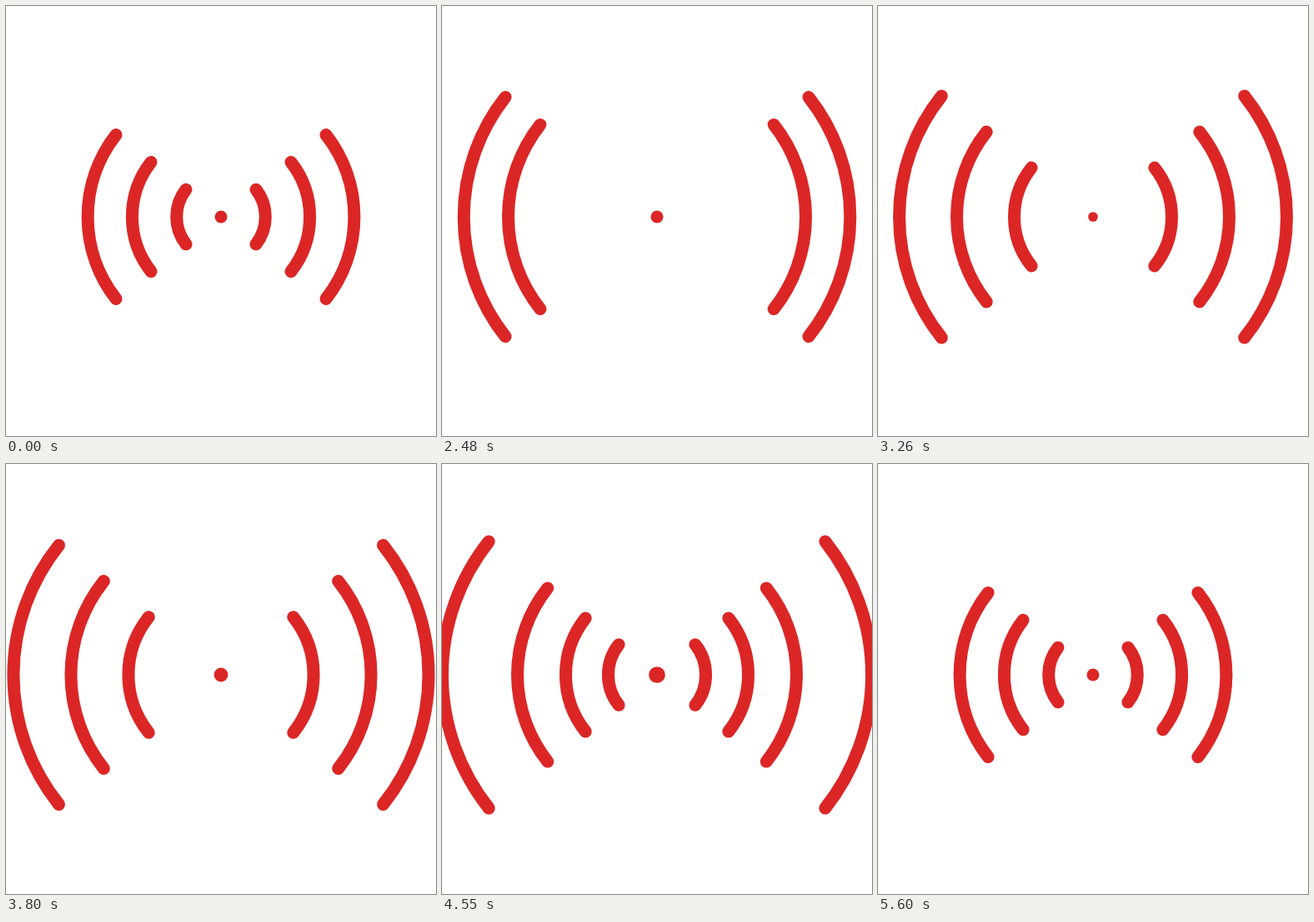
Write an HTML page with a canvas that moves like this. It is 516x516 px and loops after 5630 ms.

```html
<!DOCTYPE html>
<html lang="en">
<head>
<meta charset="utf-8">
<title>Signal waves</title>
<style>
  html, body { margin: 0; width: 100%; height: 100%; overflow: hidden; background: #fff; }
  canvas { display: block; width: 100vw; height: 100vh; }
</style>
</head>
<body>
<canvas id="stage" width="516" height="516"></canvas>
<script>
const ctx = document.getElementById('stage').getContext('2d');
const LOOP = 5630, START = 2030, END = 5600;
const CX = 258, CY = 253;
const STEP = 53.3, REST = [STEP, 2 * STEP, 3 * STEP];
const SPEED = 0.2875, PERIOD = 240, FIRST = 2455, MAX_R = 276;
const PULSE_FROM = 2954, PULSE_TO = 4550;
const SETTLE_FROM = [4110, 4083, 3895];

const bell = (t, mid, width) => Math.exp(-(((t - mid) / width) ** 2));

function backOut(x) {
  const u = Math.min(x, 1) - 1;
  return 1 + 2.7 * u ** 3 + 1.7 * u ** 2;
}

function radii(t) {
  if (t < START || t >= END) return REST;
  const list = [];

  // The resting arcs fly off
  if (t < 2585) {
    const x = t - START, d = SPEED * x * x / (x + 16);
    list.push(...REST.map(r => r + d).filter(r => r < 264));
  }

  // Evenly spaced waves follow, the first ones a little ahead
  const age = t - FIRST;
  const travel = SPEED * age + 15 * Math.exp(-age / 270);
  for (let k = 0; k < 6; k++) list.push(travel - k * SPEED * PERIOD);

  // The last three overshoot and come to rest
  REST.forEach((r, i) => {
    const x = (t - SETTLE_FROM[i]) / (800 + 375 * i);
    if (x > 0) list.push(r * backOut(x));
  });
  return list.filter(r => r >= STEP && r < MAX_R);
}

function dotRadius(t) {
  if (t < PULSE_FROM) return 7.5 + 2.5 * bell(t, 2780, 110);
  if (t >= PULSE_TO) return 7.5 + 2.4 * bell(t, 4580, 250);
  return 8 + 2.2 * Math.sin(2 * Math.PI * ((t - FIRST) / PERIOD - 0.58));
}

function arc(r, mid, half) {
  ctx.beginPath();
  ctx.arc(CX, CY, r, mid - half, mid + half);
  ctx.stroke();
}

function draw(t) {
  const glow = bell(t, 2780, 120);
  const half = (38 + 0.65 * bell(t, 3660, 1300)) * Math.PI / 180;
  ctx.fillStyle = '#fff';
  ctx.fillRect(0, 0, 516, 516);
  ctx.fillStyle = ctx.strokeStyle = `rgb(${220 + 10 * glow}, ${38 - 18 * glow}, ${38 - 18 * glow})`;
  ctx.lineWidth = 15;
  ctx.lineCap = 'round';
  for (const r of radii(t)) {
    arc(r, 0, half);
    arc(r, Math.PI, half);
  }
  ctx.beginPath();
  ctx.arc(CX, CY, dotRadius(t), 0, 2 * Math.PI);
  ctx.fill();
}

const begin = performance.now();
function tick() {
  draw((performance.now() - begin) % LOOP);
  requestAnimationFrame(tick);
}
tick();
</script>
</body>
</html>
```
